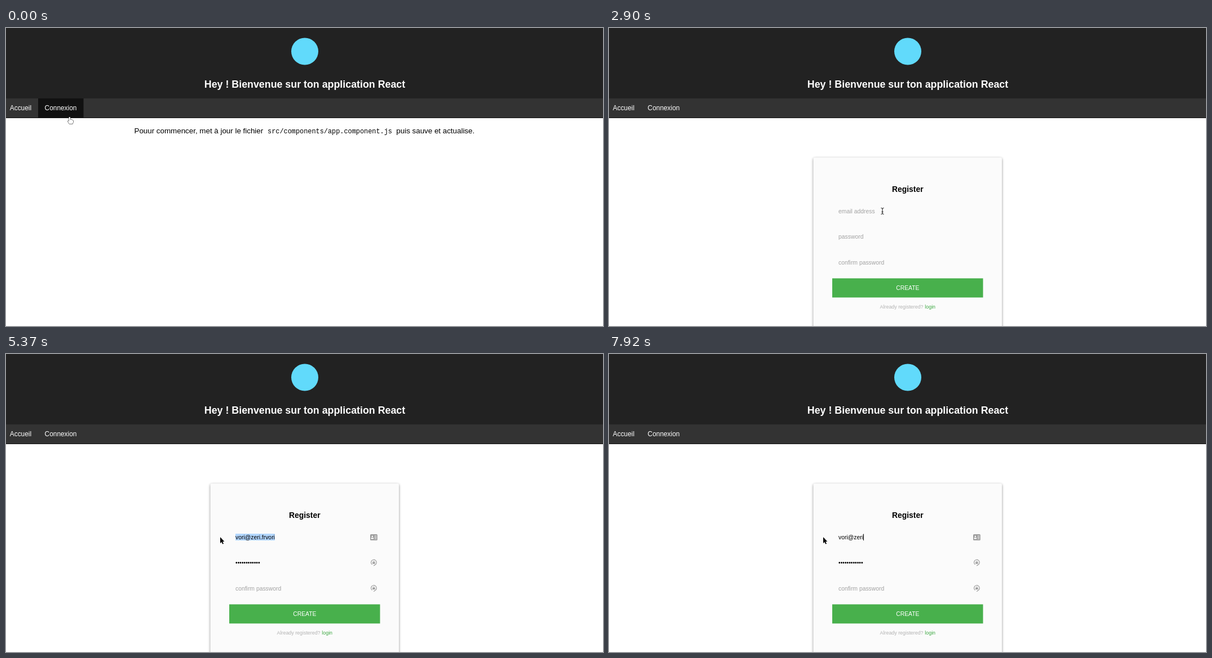
Recreate the animation shown at these times as an HTML page with a canvas. Size 1059 px wide and 529 px high, loop 8 s.

```html
<!DOCTYPE html>
<html lang="fr">
<head>
<meta charset="utf-8">
<title>Connexion</title>
<style>
  html, body { margin: 0; width: 100%; height: 100%; overflow: hidden; background: #fff; }
  canvas { display: block; width: 1059px; height: 529px; }
</style>
</head>
<body>
<canvas id="stage" width="1059" height="529"></canvas>
<script>
const ctx = document.getElementById('stage').getContext('2d');
const LOOP = 8000, STEP = 140;
const SANS = '"Liberation Sans", Arial, sans-serif';
const MONO = '"Liberation Mono", "Courier New", monospace';
const GREEN = '#48b04c', HINT = '#a2a2a2';
const FIELD = `10.39px ${SANS}`, SMALL = `8.9px ${SANS}`, TITLE = `bold 13.9px ${SANS}`;
const EMAIL = 'vori@zeri.fr', DOTS = '•'.repeat(12);

// Moments in ms
const T = { login: 700, leave: 1260, fill: 1400, register: 2660, refill: 3220, focus: 3440, drag: 4620, dragEnd: 5240 };
const APPENDED = [3640, 3780, 3920, 4060];
const RETYPED = [5740, 5880, 6020, 6160, 6580, 7000, 7140, 7280, 7420];

// Pointer track: time, x, y
const TRACK = [
  [0, 113, 158], [120, 113, 158], [560, 117, 148], [1150, 117, 148],
  [1820, 565, 379], [2340, 565, 379], [2520, 560, 470], [2660, 560, 470],
  [2800, 485, 325], [4540, 485, 325], [5240, 380, 325], [LOOP, 380, 325]
];

const HAND = new Path2D('M-1.5 1.2C-1.5-.3 1-.3 1 1.2V4.6L2.6 4.8 4.4 5.2 6 6V9.5L5 12.5H-.5L-3 8.8C-4.3 7-3.2 6.2-1.5 7.8Z');
const ARROW = new Path2D('M0 0V11L2.5 8.7 4.2 12.6 6 11.8 4.3 8H7.4Z');
const BEAM = new Path2D('M-2.5-5.5Q0-5.5 0-4Q0-5.5 2.5-5.5M0-4V4M-2.5 5.5Q0 5.5 0 4Q0 5.5 2.5 5.5M-1.5 1.5H1.5');

const count = (times, t) => times.filter(m => m <= t).length;

function rect(x, y, w, h, color) {
  ctx.fillStyle = color;
  ctx.fillRect(x, y, w, h);
}

function round(x, y, w, h, r, color) {
  ctx.fillStyle = color;
  ctx.beginPath();
  ctx.roundRect(x, y, w, h, r);
  ctx.fill();
}

function disc(x, y, r, color) {
  ctx.fillStyle = color;
  ctx.beginPath();
  ctx.arc(x, y, r, 0, 2 * Math.PI);
  ctx.fill();
}

function text(str, x, y, font, color, align = 'left') {
  ctx.font = font;
  ctx.fillStyle = color;
  ctx.textAlign = align;
  ctx.fillText(str, x, y);
}

function widthOf(str) {
  ctx.font = FIELD;
  return ctx.measureText(str).width;
}

function pointerAt(t) {
  const i = Math.max(1, TRACK.findIndex(k => k[0] > t));
  const [t0, x0, y0] = TRACK[i - 1], [t1, x1, y1] = TRACK[i];
  const p = (t - t0) / (t1 - t0);
  return [x0 + (x1 - x0) * p, y0 + (y1 - y0) * p];
}

function drawHeader(hover) {
  rect(0, 0, 1059, 125, '#222');
  disc(530, 41.5, 24, '#61dafb');
  text('Hey ! Bienvenue sur ton application React', 530, 105.5, `bold 17.82px ${SANS}`, '#fff', 'center');
  rect(0, 125, 1059, 34, '#333');
  if (hover) rect(57, 125, 80.5, 34, '#111');
  rect(0, 159, 1059, 1, '#111');
  text('Accueil', 6.8, 146, `11.88px ${SANS}`, '#fff');
  text('Connexion', 68.6, 146, `11.88px ${SANS}`, '#fff');
}

function drawHome() {
  const font = `13.36px ${SANS}`;
  text('Pouur commencer, met à jour le fichier', 227.5, 186.5, font, '#000');
  text('src/components/app.component.js', 464, 186.5, `11.88px ${MONO}`, '#000');
  text('puis sauve et actualise.', 692.3, 186.5, font, '#000');
}

function drawCard(y, h, fill) {
  ctx.save();
  ctx.shadowColor = 'rgba(0,0,0,.45)';
  ctx.shadowBlur = 4;
  ctx.shadowOffsetY = 1.5;
  round(362.5, y, 334.5, h, 2, fill);
  ctx.restore();
}

function drawButton(label, y) {
  rect(396, y, 267.5, 34, GREEN);
  text(label, 529.8, y + 20.7, FIELD, '#fff', 'center');
}

function drawFoot(lead, link, x, linkX, y) {
  text(lead, x, y, SMALL, '#b3b3b3');
  text(link, linkX, y, SMALL, '#3fa944');
}

function drawField(value, hint, y) {
  text(value || hint, 407, y, FIELD, value ? '#000' : HINT);
}

function drawBadge(y) {
  round(646, y - 7, 12, 10, 1.5, '#777');
  round(650, y - 2, 9.5, 9.5, 2, '#fcfcfc');
  round(651, y - 1, 7.5, 7.5, 1.5, '#777');
  text('4', 654.8, y + 5.4, `bold 7px ${SANS}`, '#fff', 'center');
}

function drawIdCard() {
  round(646, 320, 12.8, 10.8, 1.5, '#9b9b9b');
  disc(649.8, 323.8, 1.4, '#fff');
  rect(647.6, 326, 4.4, 2.4, '#fff');
  for (const y of [322.5, 325, 327.5]) rect(653.5, y, 4, 1, '#fff');
}

function drawLock(y) {
  ctx.strokeStyle = '#9b9b9b';
  ctx.lineWidth = 1.2;
  ctx.beginPath();
  ctx.arc(652.4, y, 4.8, 2.2, 7.4);
  ctx.lineTo(652.2, y + 6);
  ctx.stroke();
  ctx.lineWidth = 0.9;
  ctx.beginPath();
  ctx.arc(652.4, y - 0.8, 1.4, Math.PI, 0);
  ctx.stroke();
  rect(650.2, y - 0.7, 4.4, 3.2, '#9b9b9b');
}

function drawLogin(t) {
  const filled = t >= T.fill;
  drawCard(253, 258, '#fdfdfd');
  text('Login', 529.8, 313, TITLE, '#000', 'center');
  drawField(filled && EMAIL, 'username', 351.6);
  drawField(filled && DOTS, 'password', 396.8);
  if (filled) {
    drawBadge(348);
    drawBadge(393);
  }
  drawButton('LOGIN', 421.4);
  drawFoot('Not registered?', 'Create an account', 461.4, 525, 474.8);
}

function emailAt(t) {
  if (t < T.refill) return '';
  const typed = count(RETYPED, t);
  if (typed) return EMAIL.slice(0, typed);
  return EMAIL + EMAIL.slice(0, count(APPENDED, t));
}

function drawRegister(t, pointerX) {
  const email = emailAt(t), end = 407 + widthOf(email);
  const selecting = t >= T.drag && t < RETYPED[0];
  drawCard(230, 320, '#fbfbfb');
  text('Register', 529.8, 290.6, TITLE, '#000', 'center');
  if (selecting) {
    const from = Math.min(end, Math.max(407, pointerX));
    rect(from, 319, end - from, 12, '#b3d7ff');
  }
  drawField(email, 'email address', 329.2);
  if (t >= T.focus && !selecting) rect(Math.round(end), 319.5, 1, 11.5, '#000');
  drawField(t >= T.refill && DOTS, 'password', 374.4);
  drawField('', 'confirm password', 419.7);
  if (t >= T.focus) {
    drawIdCard();
    drawLock(370);
    drawLock(415.5);
  }
  drawButton('CREATE', 444.4);
  drawFoot('Already registered?', 'login', 480.6, 560.3, 497.8);
}

function drawPointer(t, x, y) {
  const overLink = t < T.leave || (t >= 2500 && t < 2800);
  const overText = t >= 2800 && t < T.dragEnd;
  ctx.save();
  ctx.translate(x, y);
  ctx.lineJoin = 'round';
  ctx.lineWidth = 1;
  if (overText) {
    ctx.strokeStyle = '#111';
    ctx.stroke(BEAM);
  } else {
    const shape = overLink ? HAND : ARROW;
    ctx.strokeStyle = overLink ? '#000' : '#fff';
    ctx.fillStyle = overLink ? '#fff' : '#000';
    ctx.stroke(shape);
    ctx.fill(shape);
  }
  ctx.restore();
}

function draw(now) {
  const t = Math.floor((now % LOOP) / STEP) * STEP;
  const [x, y] = pointerAt(t);
  rect(0, 0, 1059, 529, '#fff');
  drawHeader(t < T.leave);
  if (t < T.login) drawHome();
  else if (t < T.register) drawLogin(t);
  else drawRegister(t, x);
  drawPointer(t, x, y);
}

const start = performance.now();
function tick() {
  draw(performance.now() - start);
  requestAnimationFrame(tick);
}
tick();
</script>
</body>
</html>
```
